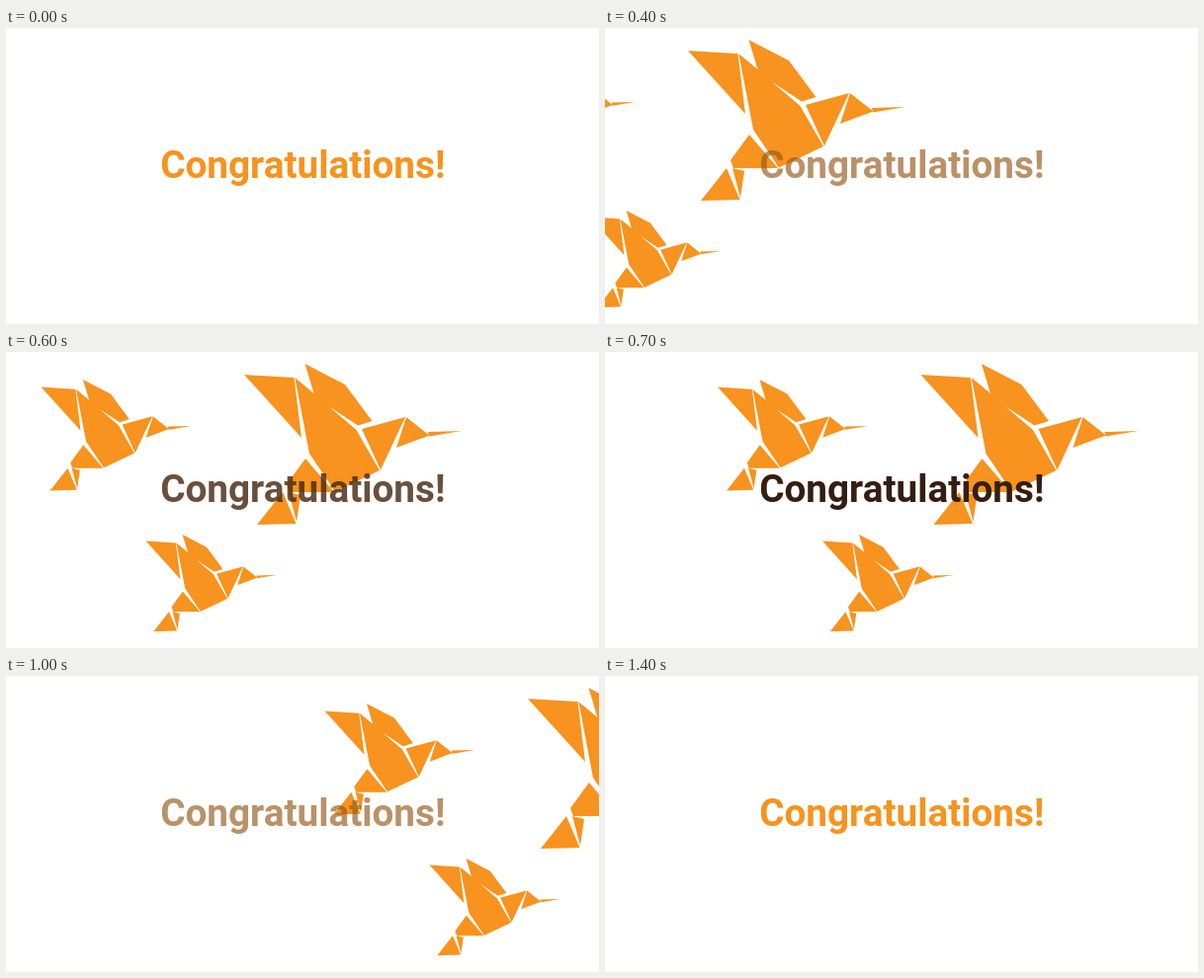
Recreate the animation shown at these times as an HTML page. Size 600 px wide and 300 px high, loop 1500 ms.

```html
<!DOCTYPE html>
<html lang="en">
<head>
<meta charset="utf-8">
<title>Congratulations!</title>
<style>
  html, body { margin: 0; width: 100%; height: 100%; overflow: hidden; background: #fff; }
  svg { display: block; }
  text { font: 700 38.7px Roboto, sans-serif; text-anchor: middle; }
</style>
</head>
<body>
<svg width="600" height="300" viewBox="0 0 600 300" fill="#f7931e">
  <defs>
    <path id="bird" d="
      M0 11 50.5 14 58 75Z
      M51.3 14 70.5 30 61.5 0 102 21 129.5 58 115 62.5 85.5 43 113.5 67 137 108 92 129.5 66 91Z
      M119 66 163 54 138 107.5Z
      M164 54 187.5 72.5 154 85Z
      M186 69 220 68 187.5 73.5Z
      M62 96 91 130 46 130 43 122Z
      M39 130 52.5 162 13 163Z
      M45 130 57 133 53 160Z"/>
  </defs>
  <use class="bird" href="#bird"/>
  <use class="bird" href="#bird"/>
  <use class="bird" href="#bird"/>
  <text id="bright" x="300.3" y="152">Congratulations!</text>
  <text id="dark" x="300.3" y="152" fill="#341e14">Congratulations!</text>
</svg>
<script>
  const STEP = 100, STEPS = 15, MIDDLE = 7;
  // Position of each bird at the middle step
  const flock = [
    { x: 319.5, y: 12, scale: 1 },
    { x: 114, y: 28, scale: 0.69 },
    { x: 220, y: 185, scale: 0.602 },
  ];
  const birds = document.querySelectorAll('.bird');
  const bright = document.getElementById('bright');
  const dark = document.getElementById('dark');

  function draw(now) {
    const offset = Math.floor(now / STEP) % STEPS - MIDDLE;
    const shift = offset * (offset < 0 ? 78.5 : 69.5);
    flock.forEach(({ x, y, scale }, i) =>
      birds[i].setAttribute('transform', `translate(${x + shift} ${y}) scale(${scale})`));

    // The bright text fades while the dark one appears, then back
    const mix = 1 - Math.abs(offset) / MIDDLE;
    bright.setAttribute('opacity', 1 - 1.45 * mix / (1 + mix));
    dark.setAttribute('opacity', mix * mix);
  }

  function loop() {
    draw(performance.now());
    requestAnimationFrame(loop);
  }
  loop();
</script>
</body>
</html>
```
